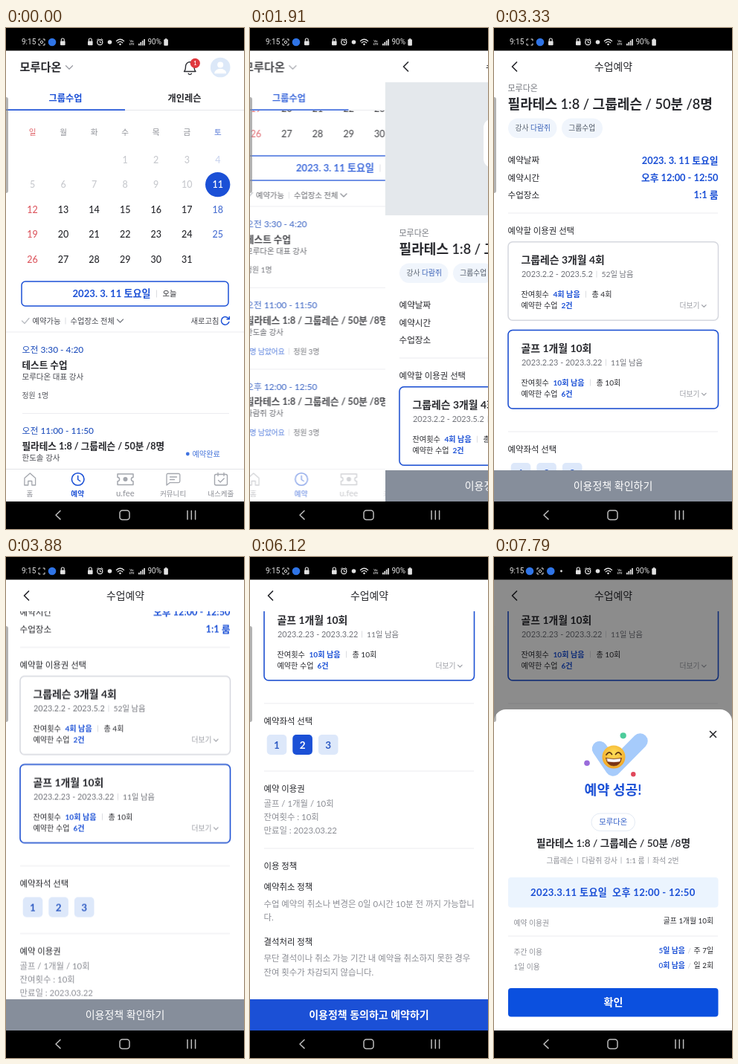
These frames come from a looping animation (320x674 px, 8000 ms). An HTML page:

```html
<!DOCTYPE html>
<html lang="ko">
<head>
<meta charset="utf-8">
<title>수업예약</title>
<style>
html, body { margin: 0; width: 100%; height: 100%; overflow: hidden; background: #000; }
svg { display: block; width: 100vw; height: 100vh; }
text { font-family: Lato, 'Noto Sans CJK KR', sans-serif; white-space: pre; }
.sys { font-family: Roboto, 'Noto Sans', sans-serif; }
.anim { animation: 8s cubic-bezier(.33, .44, .67, 1) infinite; }
.list-scroll { animation-name: listScroll; }
.list-page { animation-name: listPage; }
.tab-bar { animation-name: tabBar; }
.book-page { animation-name: bookPage; }
.book-scroll { animation-name: bookScroll; }
.card-off { animation-name: cardOff; }
.card-on { animation-name: cardOn; }
.seat-on { animation-name: seatOn; }
.agree { animation-name: agree; animation-timing-function: step-end; }
.dim { animation-name: dim; }
.sheet { animation-name: sheet; animation-timing-function: cubic-bezier(.32, .72, 0, 1); }
.blink { animation-name: blink; animation-timing-function: step-end; }
.notes-old { animation-name: notesOld; animation-timing-function: step-end; }
.notes-new { animation-name: notesNew; animation-timing-function: step-end; }
@keyframes listScroll { 0%, 3.7% { transform: translateY(0); } 12.125%, to { transform: translateY(-169px); } }
@keyframes listPage {
  0%, 22.8% { transform: translateX(0); opacity: 1; }
  26.25%, to { transform: translateX(-64px); opacity: .6; }
}
@keyframes tabBar { 0%, 22.8% { opacity: 1; } 26.25%, to { opacity: 0; } }
@keyframes bookPage { 0%, 22.8% { transform: translateX(320px); } 26.25%, to { transform: translateX(0); } }
@keyframes bookScroll {
  0%, 30.4% { transform: translateY(0); }
  36%, 44.5% { transform: translateY(-195px); }
  50.4%, 64.5% { transform: translateY(-345px); }
  67.8%, to { transform: translateY(-541px); }
}
@keyframes cardOff { 0%, 39.7% { opacity: 1; } 41.5%, to { opacity: 0; } }
@keyframes cardOn { 0%, 39.7% { opacity: 0; } 41.5%, to { opacity: 1; } }
@keyframes seatOn { 0%, 56.9% { opacity: 0; } 59%, to { opacity: 1; } }
@keyframes agree { 0% { opacity: 0; } 67.4%, to { opacity: 1; } }
@keyframes dim { 0%, 79.5% { opacity: 0; } 84%, to { opacity: .45; } }
@keyframes sheet { 0%, 80% { transform: translateY(440px); } 86.4%, to { transform: translateY(0); } }
@keyframes blink { 0%, 14.75%, 52.25%, to { opacity: 1; } 3.75%, 28.75% { opacity: 0; } }
@keyframes notesOld { 0% { opacity: 1; } 87.1%, to { opacity: 0; } }
@keyframes notesNew { 0% { opacity: 0; } 87.1%, to { opacity: 1; } }
</style>
</head>
<body>
<svg id="stage" viewBox="0 0 320 674" preserveAspectRatio="none"></svg>
<script>
const BLUE = '#1b50d6', INK = '#26272c', GRAY = '#8c8e95', PALE = '#c7c9ce', LINE = '#ececf0';
const BRAND = '모루다온', COACH = '다람쥐', LESSON = '필라테스 1:8 / 그룹레슨 / 50분 /8명';

// y is the visual middle of the line
const text = (x, y, str, size = 11.4, fill = INK, weight = 400, anchor = 'start', extra = '') =>
  `<text x="${x}" y="${(y + size * .37).toFixed(2)}" font-size="${size}" fill="${fill}" font-weight="${weight}" text-anchor="${anchor}" ${extra}>${str}</text>`;
const mid = (x, y, str, size, fill, weight) => text(x, y, str, size, fill, weight, 'middle');
const end = (x, y, str, size, fill, weight) => text(x, y, str, size, fill, weight, 'end');
const rect = (x, y, w, h, fill, r = 0, extra = '') =>
  `<rect x="${x}" y="${y}" width="${w}" height="${h}" rx="${r}" fill="${fill}" ${extra}/>`;
const frame = (x, y, w, h, r, stroke, width = 1.5) =>
  rect(x, y, w, h, 'none', r, `stroke="${stroke}" stroke-width="${width}"`);
const dot = (x, y, r, fill) => `<circle cx="${x}" cy="${y}" r="${r}" fill="${fill}"/>`;
const ring = (x, y, r, stroke, width = 1) =>
  `<circle cx="${x}" cy="${y}" r="${r}" fill="none" stroke="${stroke}" stroke-width="${width}"/>`;
const path = (d, stroke, width = 1.3, fill = 'none') =>
  `<path d="${d}" stroke="${stroke}" stroke-width="${width}" fill="${fill}" stroke-linecap="round" stroke-linejoin="round"/>`;
const rule = (y, x = 19, w = 282) => rect(x, y - .5, w, 1, LINE);
const bar = (x, y, h = 9, color = '#d3d5da') => rect(x - .4, y - h / 2, .8, h, color);
const chevron = (x, y, s, color) => path(`M${x - s} ${y - s / 2}l${s} ${s}l${s} ${-s}`, color, 1.2);
const anim = (name, body) => `<g class="anim ${name}">${body}</g>`;
const clip = (id, body) => `<g clip-path="url(#${id})">${body}</g>`;

function calendar() {
  const colX = i => 35.5 + i * 41.55;
  let out = [...'일월화수목금토'].map((d, i) =>
    mid(colX(i), 140, d, 10.6, i === 0 ? '#e0676d' : i === 6 ? '#5577d6' : GRAY)).join('');
  for (let day = 1; day <= 31; day++) {
    const cell = day + 2, col = cell % 7, y = 177 + Math.floor(cell / 7) * 33.6;
    let color = col === 0 ? '#dd5a62' : col === 6 ? '#4a70d2' : INK;
    if (day < 11) color = col === 6 ? '#c9d3ee' : PALE;
    if (day === 11) { out += dot(284.7, y, 16.7, BLUE); color = '#fff'; }
    out += mid(colX(col), y, day, 12.5, color, day === 11 ? 600 : 500);
  }
  return out;
}

const lesson = (y, time, title, coach) =>
  text(21.5, y, time, 11.9, '#2150bd', 500) + text(21.5, y + 20, title, 12.6, INK, 700) +
  text(21.5, y + 36, coach, 10.5, '#46484f');
const seatsLeft = (y, left) =>
  text(21.5, y, left, 9.7, '#2c5fd6', 500) + bar(80, y) + text(86, y, '정원 3명', 9.7, '#55575e');

function lessonList() {
  return calendar() +
    frame(21, 341, 278, 33, 5, BLUE) + text(89.5, 357.5, '2023. 3. 11 토요일', 13.1, BLUE, 700) +
    bar(202.5, 357.5, 10) + text(210.5, 357.5, '오늘', 10.3, INK, 500) +
    path('M21.500 394l3.500 3.500l6-7', '#b9bcc2', 1.3) + text(35.5, 394, '예약가능', 10.3, '#45474e') +
    bar(80, 394) + text(86.5, 394, '수업장소 전체', 10.3, '#45474e') + chevron(153.5, 394, 4, '#777a82') +
    text(248.5, 394, '새로고침', 10.3, '#45474e') +
    path('M299.500 391.500a5.300 5.300 0 1 0 .3 4M300.300 388.500v3.300h-3.300', BLUE, 1.5) +
    rule(409, 0, 320) +
    lesson(433, '오전 3:30 - 4:20', '테스트 수업', BRAND + ' 대표 강사') + text(21.5, 494.5, '정원 1명', 9.9, '#55575e') +
    rule(518.5, 22, 278) +
    lesson(542, '오전 11:00 - 11:50', LESSON, '한도솔 강사') + seatsLeft(604, '1명 남았어요') +
    dot(244.3, 573, 2.4, '#3f72e0') + text(250.5, 573, '예약완료', 10.2, '#4574da') +
    rule(628, 22, 278) +
    lesson(651.5, '오후 12:00 - 12:50', LESSON, COACH + ' 강사') + seatsLeft(713, '3명 남았어요') +
    rect(240, 669.5, 58.5, 26, '#0e50df', 13) + mid(269.2, 682.3, '예약하기', 10, '#fff', 600);
}

function tabBar() {
  const c = '#a3a6ad';
  const labels = ['홈', '예약', 'u.fee', '커뮤니티', '내스케줄'];
  const items = rect(0, 593, 320, 1, '#e3e4e8') +
    path('M25 605.500l7.300-6.500l7.300 6.500v9.500h-4.800v-5.500h-5v5.500h-5z', c) +
    ring(96.7, 607, 8.3, BLUE, 1.6) + path('M96.700 602.500v5l3 2', BLUE, 1.5) +
    path('M150 600h21v4.500a2.600 2.600 0 0 0 0 5.200v4.800h-21v-4.800a2.600 2.600 0 0 0 0-5.200z', c, 1.5) + dot(160.5, 607, 3, c) +
    path('M217 599.500h15a1.800 1.800 0 0 1 1.800 1.800v8.500a1.800 1.800 0 0 1-1.800 1.800h-11.500l-4.500 3.400v-13.700a1.800 1.800 0 0 1 1-1.800zM220.500 604h9M220.500 607.500h6', c) +
    frame(280.5, 600.5, 17, 14.5, 2, c, 1.4) + path('M285 598.500v4M293 598.500v4M285.500 608.500l2.700 2.500l5-5', c) +
    labels.map((s, i) => mid(32 + i * 64.2, 626, s, i === 2 ? 11.3 : 9.6, i === 1 ? BLUE : GRAY, i === 1 ? 600 : 400)).join('');
  return rect(0, 593, 320, 44, '#fff') + anim('tab-bar', items);
}

function listPage() {
  const top = rect(0, 30, 320, 80, '#fff') +
    text(18.5, 52, BRAND, 15.2, INK, 600) + chevron(85, 53, 4.5, '#9a9ca3') +
    path('M239.500 58.500h15.500c-2-2-2-4-2-7a5.700 5.700 0 0 0-11.500 0c0 3 0 5-2 7zM245.200 61.300a2.300 2.300 0 0 0 4.200 0', '#2c2d33', 1.4) +
    dot(254.3, 47.3, 6.6, '#e0393f') + mid(254.3, 47.3, '1', 8, '#fff', 500) +
    dot(288.2, 53, 13.3, '#dce8f8') + dot(288.2, 49.5, 4, '#fff') + path('M280.700 60.500c0-7 15-7 15 0z', '#fff', 1, '#fff') +
    mid(80, 94, '그룹수업', 12.2, BLUE, 700) + mid(240, 94, '개인레슨', 12.2, INK, 600) +
    rect(0, 110, 320, 1, '#e6e7eb') + rect(0, 109.3, 160, 1.7, BLUE);
  return rect(0, 30, 320, 607, '#fff') + clip('listArea', anim('list-scroll', lessonList())) + top + tabBar();
}

function passCard(y, state, title, period, x2, days, left, total, booked) {
  return frame(19, y, 282.5, 105.5, 6, '#d5d7de') + anim(state, frame(19, y, 282.5, 105.5, 6, BLUE)) +
    text(36.5, y + 24, title, 13.9, INK, 700) +
    text(37, y + 43.5, period, 10.9, '#707279') + bar(x2 - 6.5, y + 43.5) + text(x2, y + 43.5, days, 10.3, '#707279') +
    text(36.5, y + 70.5, '잔여횟수', 10.2, INK) + text(79.5, y + 70.5, left, 10.1, BLUE, 700) +
    bar(x2 < 150 ? 123.5 : 129.5, y + 70.5) + text(x2 < 150 ? 131.5 : 137.5, y + 70.5, total, 10.1, INK) +
    text(36.5, y + 86, '예약한 수업', 10.1, INK) + text(90.5, y + 86, booked, 10.1, BLUE, 700) +
    text(249.5, y + 86, '더보기', 9.8, '#9b9da4') + chevron(282.3, y + 86.3, 2.8, '#9b9da4');
}

const seat = (n, bg, color) =>
  rect(22.7 + (n - 1) * 34.6, 780, 26.6, 27, bg, 5) + mid(36 + (n - 1) * 34.6, 793.5, n, 13.5, color, 700);

function bookingForm() {
  const rows = [['예약날짜', '2023. 3. 11 토요일'], ['예약시간', '오후 12:00 - 12:50'], ['수업장소', '1:1 룸']];
  const notes = [[872.5, '골프 / 1개월 / 10회'], [891, '잔여횟수 : 10회'], [908.5, '만료일 : 2023.03.22'],
    [1008, '수업 예약의 취소나 변경은 0일 0시간 10분 전 까지 가능합니'], [1026, '다.'],
    [1081, '무단 결석이나 취소 가능 기간 내 예약을 취소하지 못한 경우'], [1100, '잔여 횟수가 차감되지 않습니다.']];
  const heads = [[467.5, '예약할 이용권 선택'], [762, '예약좌석 선택'], [853, '예약 이용권'],
    [957, '이용 정책'], [985, '예약취소 정책'], [1058.5, '결석처리 정책']];
  return rect(0, 73, 320, 179, '#e4e8ec') + rect(132, 122, 56, 66, '#fff', 12) +
    text(18.5, 275.5, BRAND, 11, '#777a81') + text(18.5, 297, LESSON, 18.1, INK, 600) +
    rect(19, 316.5, 65.5, 26.5, '#f0f5fc', 13.2) + text(28.5, 329.5, `강사 <tspan fill="#3a62b8" font-weight="500">${COACH}</tspan>`, 9.8, '#5b6470') +
    rect(91, 316.5, 55, 26.5, '#f0f5fc', 13.2) + mid(118.3, 329.5, '그룹수업', 9.8, '#4c5562') +
    rows.map(([k, v], i) => text(18.5, 373 + i * 23.3, k, 11.6, INK, 500) + end(301.5, 373 + i * 23.3, v, 12.8, BLUE, 700)).join('') +
    [444, 738, 829, 933].map(y => rule(y)).join('') +
    heads.map(([y, s]) => text(18.5, y, s, 11.4, INK, 500)).join('') +
    notes.map(([y, s]) => text(18.5, y, s, 11.4, GRAY)).join('') +
    passCard(482.7, 'card-off', '그룹레슨 3개월 4회', '2023.2.2 - 2023.5.2', 144.5, '52일 남음', '4회 남음', '총 4회', '2건') +
    passCard(601.5, 'card-on', '골프 1개월 10회', '2023.2.23 - 2023.3.22', 157, '11일 남음', '10회 남음', '총 10회', '6건') +
    [1, 2, 3].map(n => seat(n, '#dde8fa', '#2f5cc4')).join('') + anim('seat-on', seat(2, BLUE, '#fff'));
}

function bookPage() {
  return rect(0, 30, 320, 607, '#fff') + clip('formArea', anim('book-scroll', bookingForm())) +
    path('M30.500 46l-6 6l6 6', INK, 1.7) + mid(160.5, 52, '수업예약', 13.9, INK, 500) +
    rect(0, 595, 320, 42, '#868e9b') + mid(160, 616, '이용정책 확인하기', 14, '#fff', 500) +
    anim('agree', rect(0, 595, 320, 42, BLUE) + mid(160, 616, '이용정책 동의하고 예약하기', 14, '#fff', 600));
}

function smiley() {
  return dot(161, 269, 15.5, 'url(#face)') +
    path('M151 266q4-6 7.500-.5M163.500 265.500q4-5.500 7.500 .5', '#5b3413', 1.8) +
    path('M150.500 270.500q10.500 2 21 0q-1.500 10.500-10.500 10.500t-10.500-10.500z', '#6b3410', .6, '#7a3314') +
    path('M152 271.500q9 1.500 18 0l-1 3.500q-8 1.500-16 0z', '#fff', .5, '#fff');
}

function sheet() {
  const usage = (y, label, left, total) => text(26.5, y, label, 9.8, GRAY) +
    text(221.5, y - 2, left, 9.9, BLUE, 600) + text(260.5, y - 2, '/', 9.5, PALE) + end(295, y - 2, total, 9.9, INK);
  const info = [[70.5, '그룹레슨'], [118, COACH + ' 강사'], [177, '1:1 룸'], [213, '좌석 2번']];
  return path('M0 637v-416a16 16 0 0 1 16-16h288a16 16 0 0 1 16 16v416z', 'none', 0, '#fff') +
    path('M290.500 234.500l8 8M298.500 234.500l-8 8', INK, 1.6) +
    path('M142 258l18 26.500l36.500-37', '#a6cbfb', 20.5) +
    dot(173.7, 240.3, 4.1, '#4dcc9b') + dot(125, 277.2, 3.8, '#9a6cdb') + dot(187.3, 292.3, 3.2, '#e0485b') + smiley() +
    mid(160, 313.5, '예약 성공!', 18.3, BLUE, 700) +
    frame(131, 345, 58.5, 23.5, 11.7, '#e3eaf4', 1) + mid(160.2, 356.5, BRAND, 10.3, '#2d5bc6', 500) +
    mid(160.5, 385, LESSON, 13.6, INK, 600) +
    info.map(([x, s]) => text(x, 408, s, 9.9, GRAY)).join('') + [112.5, 171, 207.5].map(x => bar(x, 408, 9, '#a9abb2')).join('') +
    rect(19, 431, 282.5, 40.5, '#ebf4fe', 4) +
    text(49, 451.3, '2023.3.11 토요일', 13.1, BLUE, 700, 'start', 'letter-spacing=".35"') +
    text(159, 451.3, '오후 12:00 - 12:50', 13.1, BLUE, 700, 'start', 'letter-spacing=".35"') +
    text(26.5, 492, '예약 이용권', 9.8, GRAY) + end(295, 489.5, '골프 1개월 10회', 9.8, INK) + rule(510) +
    usage(531, '주간 이용', '5일 남음', '주 7일') + usage(551, '1일 이용', '0회 남음', '일 2회') +
    rect(19, 580, 282.5, 38.5, '#0b50df', 4) + mid(160.5, 599, '확인', 14, '#fff', 600);
}

function statusBar() {
  const c = '#e2e2e2', sys = 'class="sys"';
  const lock = x => rect(x - 3.3, 17.5, 6.6, 5.8, c, 1) + path(`M${x - 2} 17.500v-1.500a2 2 0 0 1 4 0v1.500`, c, 1.1);
  const scan = x => path(`M${x - 4} 17v-2h2M${x + 2} 15h2v2M${x + 4} 21v2h-2M${x - 2} 23h-2v-2`, c, 1) +
    anim('blink', ring(x, 19, 1.7, c));
  const badge = x => dot(x, 19, 5.3, '#2f74e6');
  return rect(0, 0, 320, 30.5, '#000') + text(21, 18.7, '9:15', 10, c, 400, 'start', sys) +
    anim('notes-old', scan(48) + badge(62) + lock(76.3)) +
    anim('notes-new', badge(48) + scan(62) + badge(76.3) + dot(90.5, 19, 1.4, c)) +
    lock(113.3) + ring(126.3, 19.2, 3.5, c, 1.3) +
    path('M126.300 17.500v2h1.500M122.500 16l1.500-1.500M130 16l-1.500-1.500', c, 1) + dot(139.5, 19, 2.8, c) +
    path('M148.500 17.500q5-4.500 10 0M150.300 19.800q3.200-2.800 6.400 0', c, 1.3) + dot(153.5, 22, 1.3, c) +
    mid(169, 17, 'Vo', 4.5, c, 700) + mid(169, 21.3, 'LTE', 4.5, c, 700) +
    [0, 1, 2, 3].map(i => rect(178 + i * 2.4, 21 - i * 2, 1.7, 2.5 + i * 2, c)).join('') +
    text(190.5, 18.7, '90%', 10, c, 400, 'start', sys) + rect(212.3, 15.3, 5.6, 8.4, c, 1) + rect(213.8, 14.2, 2.6, 1.5, c);
}

function systemKeys() {
  const c = '#bdbdbd';
  return rect(0, 637, 320, 37, '#000') + path('M73 649.500l-6 5.700l6 5.700', c, 1.5) +
    frame(153, 649, 13, 12.5, 3.5, c, 1.5) + path('M244 649.500v11.500M249.300 649.500v11.500M254.600 649.500v11.500', c, 1.5);
}

document.getElementById('stage').innerHTML = `
  <defs>
    <clipPath id="listArea"><rect y="110" width="320" height="483"/></clipPath>
    <clipPath id="formArea"><rect y="73" width="320" height="522"/></clipPath>
    <clipPath id="app"><rect y="30" width="320" height="607"/></clipPath>
    <radialGradient id="face" cx=".5" cy=".35" r=".7"><stop offset="0" stop-color="#ffe05a"/><stop offset="1" stop-color="#f0a020"/></radialGradient>
  </defs>` +
  rect(0, 0, 320, 674, '#fff') +
  clip('app', anim('list-page', listPage()) + anim('book-page', bookPage()) +
    anim('dim', rect(0, 30, 320, 607, '#000')) + anim('sheet', sheet())) +
  rect(-3, 93, 6, 129, '#8a8a8a', 3, 'opacity=".65"') + statusBar() + systemKeys();
</script>
</body>
</html>
```
